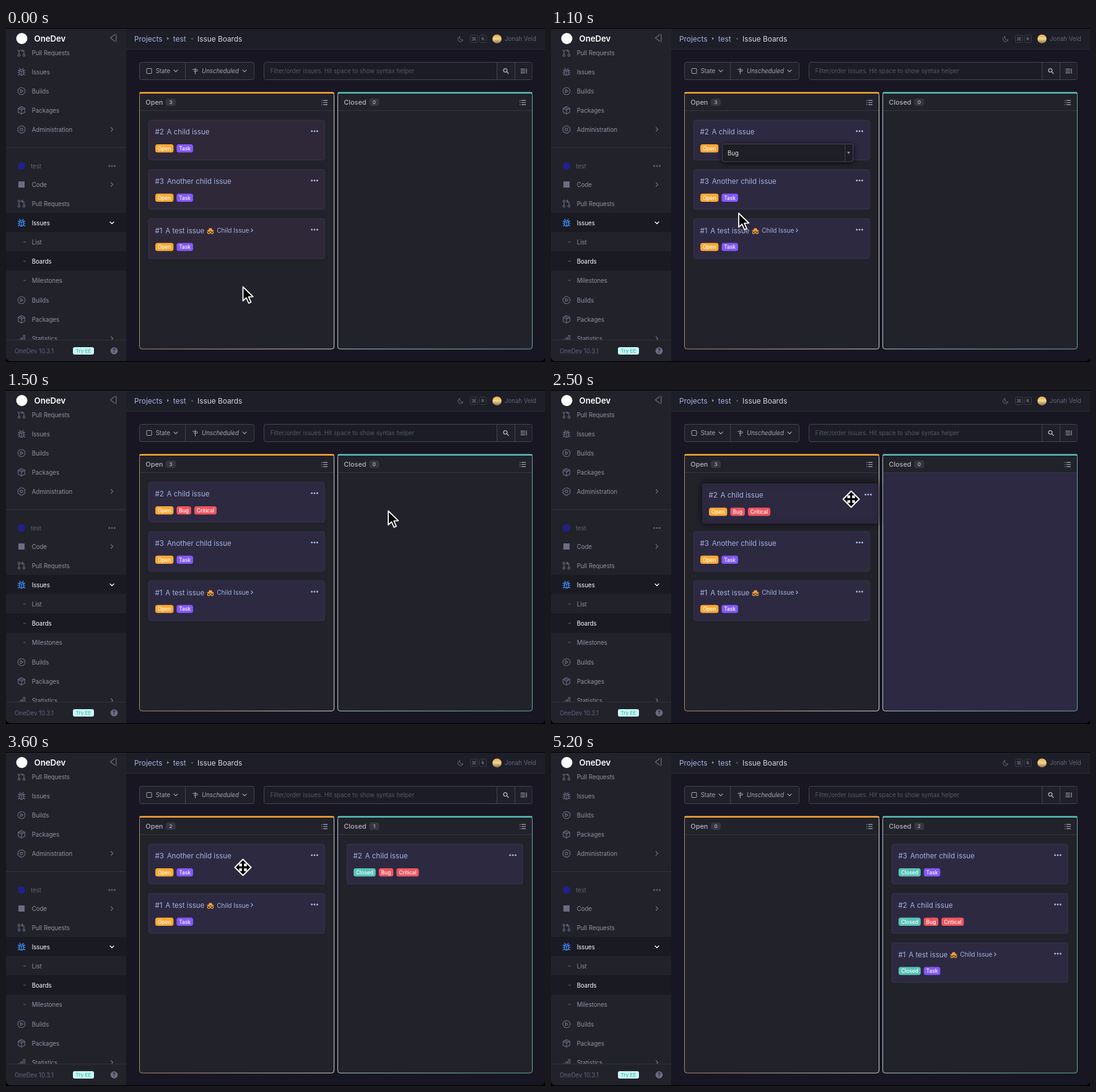
These frames come from a looping animation (870x540 px, 5.3 s). An HTML page with a canvas:

```html
<!DOCTYPE html>
<html lang="en">
<head>
<meta charset="utf-8">
<title>Issue Boards</title>
<style>
html, body { margin: 0; width: 100%; height: 100%; overflow: hidden; background: #000; }
canvas { display: block; width: 870px; height: 540px; }
</style>
</head>
<body>
<canvas id="stage" width="870" height="540"></canvas>
<script>
const ctx = document.getElementById('stage').getContext('2d');
const LOOP = 5300, STEP = 100;
const MUTED = '#9192a2', DIM = '#62637a', LINK = '#a3b3e0', ICON = '#6b6c84';
const ORANGE = '#ffa834', TEAL = '#57c3b8', RED = '#ee5560', PURPLE = '#8258fa';

// time, x, y
const cursorPath = [
  [0, 381.5, 417], [600, 292, 200], [700, 292, 200], [900, 302, 298], [1100, 302, 298],
  [1500, 616, 194], [1600, 616, 194], [2200, 434, 174], [2400, 434, 174],
  [2500, 484.5, 176.5], [2800, 752, 198], [3100, 752, 198], [3600, 382.5, 186.5],
  [3700, 424, 196], [4100, 709.5, 287], [4700, 709.5, 287], [5200, 603, -34]
];
const firstDrag = [[2500, 14, 2], [2800, 318, 24]];
const secondDrag = [[3700, 20, 4], [4000, 318, 96]];

function along(keys, t) {
  let i = 0;
  while (i < keys.length - 2 && t >= keys[i + 1][0]) i++;
  const [a, b] = [keys[i], keys[i + 1]];
  const u = Math.min(1, Math.max(0, (t - a[0]) / (b[0] - a[0])));
  const e = u * u * (3 - 2 * u);
  return [a[1] + (b[1] - a[1]) * e, a[2] + (b[2] - a[2]) * e];
}

function rect(x, y, w, h, fill) {
  ctx.fillStyle = fill;
  ctx.fillRect(x, y, w, h);
}

function box(x, y, w, h, r, fill, stroke) {
  ctx.beginPath();
  ctx.roundRect(x, y, w, h, r);
  if (fill) { ctx.fillStyle = fill; ctx.fill(); }
  if (stroke) { ctx.strokeStyle = stroke; ctx.lineWidth = 1; ctx.stroke(); }
}

function disc(x, y, r, fill) {
  ctx.beginPath();
  ctx.arc(x, y, r, 0, Math.PI * 2);
  ctx.fillStyle = fill;
  ctx.fill();
}

// y is the middle of the capital letters
function text(s, x, y, color, size = 9.62, style = '400', align = 'left') {
  ctx.font = `${style} ${size}px Inter, sans-serif`;
  ctx.textAlign = align;
  ctx.fillStyle = color;
  ctx.fillText(s, x, y + size * 0.364);
  return ctx.measureText(s).width;
}

function icon(d, x, y, stroke, width = 1.1, fill) {
  const p = new Path2D(d);
  ctx.save();
  ctx.translate(x, y);
  ctx.lineWidth = width;
  ctx.lineCap = ctx.lineJoin = 'round';
  if (fill) { ctx.fillStyle = fill; ctx.fill(p); }
  if (stroke) { ctx.strokeStyle = stroke; ctx.stroke(p); }
  ctx.restore();
}

const ring = (r, x = 0, y = 0) => `M${x - r} ${y}a${r} ${r} 0 1 0 ${2 * r} 0a${r} ${r} 0 1 0 ${-2 * r} 0`;
const shapes = {
  pull: ring(1.7, -4, -4) + ring(1.7, -4, 4) + ring(1.7, 4, 4) + 'M-4 -2V2M4 2V-2Q4 -4 2 -4H0M2 -6L0 -4L2 -2',
  bug: 'M-3.2 -1.5Q-3.2 -4 0 -4T3.2 -1.5V2Q3.2 5.4 0 5.4T-3.2 2ZM-3.2 -1.5H3.2M0 -1.5V5M-2 -4L-3 -6M2 -4L3 -6' +
    'M-3.2 1H-6M3.2 1H6M-3.2 -1L-5.4 -3M3.2 -1L5.4 -3M-3 3L-5.4 5M3 3L5.4 5',
  play: ring(5.8) + 'M-1.7 -2.6V2.6L2.6 0Z',
  cube: 'M0 -6L5.4 -3.2V3.2L0 6L-5.4 3.2V-3.2ZM-5.4 -3.2L0 -.3L5.4 -3.2M0 -.3V6M-2.7 -4.6L2.7 -1.8',
  gear: ring(2.1) + 'M-2 -5.8H2L3.2 -4.2L5 -3.8L6 -1.2L5 0L6 1.8L4.4 4L3 4.4L1.8 5.9H-1.8L-3 4.4L-4.6 4L-6 1.6L-5 0L-6 -1.4L-4.8 -3.8L-3 -4.2Z',
  bars: 'M-5.5 6V2H-3V6ZM-1.2 6V-1H1.2V6ZM3 6V-5H5.5V6Z',
  right: 'M-1.5 -3L1.5 0L-1.5 3',
  down: 'M-3 -1.5L0 1.5L3 -1.5',
  list: 'M-1.5 -3.3H4.5M-1.5 0H4.5M-1.5 3.3H4.5M-4.3 -3.3h.3M-4.3 0h.3M-4.3 3.3h.3',
  plus: 'M-3.8 0H3.8M0 -3.8V3.8',
  arrow: 'M1 1.5V24L6.3 19.2L10.3 28L14 26.3L10 17.7L17.3 17.3Z',
  diamond: 'M0 -13L13 0L0 13L-13 0Z',
  moon: 'M-1 -4A4.2 4.2 0 1 0 4.2 1.2A4 4 0 0 1 -1 -4Z'
};

function dots(x, y, color) {
  for (const d of [-4.4, 0, 4.4]) disc(x + d, y, 1.5, color);
}

function sidebar() {
  rect(0, 0, 194, 540, '#22222b');
  ctx.save();
  ctx.beginPath();
  ctx.rect(0, 35, 194, 469);
  ctx.clip();
  rect(0, 299, 194, 31, '#1a1a23');
  rect(0, 361, 194, 31.5, '#1a1a23');
  const items = [
    ['Pull Requests', 40, 'pull'], ['Issues', 71, 'bug'], ['Builds', 102, 'play'],
    ['Packages', 133, 'cube'], ['Administration', 164, 'gear', 1], ['Code', 253, '', 1],
    ['Pull Requests', 284, 'pull'], ['Builds', 440, 'play'], ['Packages', 471, 'cube'],
    ['Statistics', 502, 'bars', 1]
  ];
  for (const [label, y, shape, more] of items) {
    if (shape) icon(shapes[shape], 25, y, ICON);
    text(label, 41.7, y + .3, MUTED);
    if (more) icon(shapes.right, 171, y, ICON, 1.2);
  }
  rect(20, 248, 10, 10, ICON);
  icon(shapes.bug, 25, 315, '#3f93ff', 1.2);
  text('Issues', 41.7, 315.3, '#fff');
  icon(shapes.down, 171, 315, '#fff', 1.3);
  [['List', 346.5], ['Boards', 377.5], ['Milestones', 408.5]].forEach(([label, y], i) => {
    rect(28, y - 1, 4, 1, DIM);
    text(label, 41.7, y + .3, i === 1 ? '#fff' : MUTED);
  });
  rect(0, 193, 194, 1, '#34343f');
  disc(25, 223, 6, '#21208a');
  text('test', 40, 223.3, DIM);
  dots(171, 223, DIM);
  ctx.restore();

  disc(25.5, 17, 9, '#fff');
  text('OneDev', 45.5, 17.5, '#fff', 13.2, '600');
  icon('M3 -5.5L-4 0L3 5.5M5.3 -6V6', 172.5, 16, ICON, 1.2);
  rect(0, 504, 194, 1, '#30303b');
  text('OneDev 10.3.1', 14, 522.3, DIM);
  box(108, 516, 34, 12, 3, '#c9f7f5');
  text('Try EE', 125, 522.2, '#27b5ab', 8.2, '400', 'center');
  disc(174.5, 522, 5.8, '#6c6d82');
  text('?', 174.5, 522.2, '#22222b', 8.5, '700', 'center');
}

function topbar() {
  rect(194, 0, 676, 35, '#1e1e28');
  rect(0, 34, 870, 1, '#2c2c38');
  text('Projects', 207, 17.8, LINK, 11.85);
  icon('M-1.4 -2.4L1.6 0L-1.4 2.4Z', 261.5, 17, null, 1, MUTED);
  text('test', 269.8, 17.8, LINK, 11.85);
  disc(300.5, 17.5, 1.3, DIM);
  text('Issue Boards', 309, 17.8, '#d5d5e0', 11.85);
  icon(shapes.moon, 733.5, 17.8, ICON, 1);
  box(749.5, 11.5, 12, 12, 2, null, '#3b3b49');
  box(764.5, 11.5, 11, 12, 2, null, '#3b3b49');
  const knots = [[-2, -2], [2, -2], [-2, 2], [2, 2]].map(([x, y]) => ring(1, x, y)).join('');
  icon(knots + 'M-1 -2V2M1 -2V2M-2 -1H2M-2 1H2', 755.5, 17.5, DIM, .8);
  text('k', 770, 17.3, MUTED, 8, '400', 'center');
  const g = ctx.createLinearGradient(0, 10, 0, 25);
  g.addColorStop(0, '#e5a64d');
  g.addColorStop(.5, '#f1d68a');
  g.addColorStop(1, '#8a6b4d');
  disc(792.5, 17.7, 7.3, g);
  text('Jonah Veld', 805, 17.8, DIM);
}

function toolbar() {
  const edge = '#454552';
  box(215.5, 55.5, 185, 28, 3, '#20202a', edge);
  rect(289, 55, 1, 28, edge);
  box(227, 65.5, 8, 8, 1, null, '#a5a6b5');
  text('State', 241.7, 69.8, '#a5a6b5');
  icon(shapes.down, 274, 69.3, '#a5a6b5', 1.2);
  icon('M0 5V-4.5M-4 -2.5H2.5L4.3 -1L2.5 .5H-2', 305.5, 69.5, '#a5a6b5', 1);
  text('Unscheduled', 316, 69.8, '#a5a6b5', 9.62, 'italic 400');
  icon(shapes.down, 385, 69.3, '#a5a6b5', 1.2);
  box(416.5, 55.5, 433, 28, 3, '#1c1c26', edge);
  box(793, 56, 56.5, 27, [0, 3, 3, 0], '#20202a');
  rect(792, 55, 1, 28, edge);
  rect(821, 55, 1, 28, edge);
  text('Filter/order issues. Hit space to show syntax helper', 426.5, 69.8, '#565769');
  icon(ring(2.9, -1, -1) + 'M1.3 1.3L4 4', 807, 69.5, '#b5b5c4', 1.3);
  icon('M-4.5 -3H2M-4.5 0H2M-4.5 3H2M4.5 -3.5V3.5', 835.5, 69.5, '#b5b5c4', 1);
}

function column(x, name, count, color, sides, hot) {
  box(x, 104, 315, 415.5, 4, '#22222b');
  if (hot) box(x + 1, 134, 313, 385, [0, 0, 3, 3], '#2d2942');
  const g = ctx.createLinearGradient(x, 0, x + 315, 0);
  sides.forEach((c, i) => g.addColorStop(i, c));
  box(x + .5, 104.5, 314, 414.5, 4, null, g);
  box(x, 103.5, 315, 2.6, [3, 3, 0, 0], color);
  rect(x + 1, 133, 313, 1, '#363643');
  const w = text(name, x + 10.3, 120.3, '#b3b3c2', 10.9, '500');
  box(x + 15 + w, 114, 16, 12, 4, '#363642');
  text(count, x + 23 + w, 120.2, '#c0c0cf', 8, '500', 'center');
  icon(shapes.list, x + 299, 120.5, '#a9aac6', 1.2);
}

function card(issue, x, y, fill, lifted) {
  ctx.save();
  if (lifted) { ctx.shadowColor = '#000c'; ctx.shadowBlur = 12; }
  box(x + .5, y + .5, 283.5, 64, 3, fill, lifted ? fill : '#3a3650');
  ctx.restore();
  const w = text('#' + issue.id, x + 10.5, y + 19.3, LINK, 11.5);
  text(issue.title, x + 15.3 + w, y + 19.3, LINK, 11.5);
  if (issue.id === 1) {
    icon(ring(2, -2.7, 2.5) + ring(2, 2.7, 2.5) + 'M-5 -.8H5M-.8 2H.8', x + 100, y + 20, ORANGE, 1.2);
    icon('M-3 -1L-2 -4.6L0 -4L2 -4.6L3 -1Z', x + 100, y + 20, null, 1, ORANGE);
    text('Child Issue', x + 110.3, y + 19.5, LINK, 10);
    icon('M-1.2 -2.4L1.2 0L-1.2 2.4', x + 167, y + 19, LINK, 1.1);
  }
  dots(x + 268, y + 18, LINK);
  let bx = x + 11;
  for (const [label, color] of issue.badges) {
    ctx.font = '500 8.4px Inter, sans-serif';
    const bw = ctx.measureText(label).width + 7.8;
    box(bx, y + 39.3, bw, 13.2, 3.5, color);
    text(label, bx + bw / 2, y + 46.2, '#fff', 8.4, '500', 'center');
    bx += bw + 5;
  }
}

function typeSelect(t) {
  const open = t >= 700 && t < 1100;
  ctx.save();
  ctx.shadowColor = '#000b';
  ctx.shadowBlur = 10;
  ctx.shadowOffsetY = 2;
  box(276.5, 187.5, 211, 28.5, 3, '#1e1e27', '#474755');
  if (open) box(276.5, 216.5, 211, 176, [0, 0, 3, 3], '#1e1e27', '#474755');
  ctx.restore();
  rect(474, 188, 1, 28, '#3c3c49');
  icon(open ? 'M-2.5 2L0 -2L2.5 2Z' : 'M-2.5 -2L0 2L2.5 -2Z', 480.5, 202, null, 1, '#8b8c9c');
  text(t < 1100 ? 'Task' : 'Bug', 285, 202.3, '#e4e4ee');
  if (!open) return;
  const active = t < 800 ? 3 : t < 900 ? 1 : 2;
  ['New Feature', 'Improvement', 'Bug', 'Task', 'Build Failure', 'Support Request'].forEach((name, i) => {
    const y = 220 + 28 * i;
    if (i === active) rect(277, y, 210, 28, '#2d2d3b');
    text(name, 285, y + 14, i === active ? '#fff' : '#a9aaba');
  });
}

function boardState(t) {
  const make = (id, title, closed, ...tags) =>
    ({ id, title, badges: [closed ? ['Closed', TEAL] : ['Open', ORANGE], ...tags] });
  const task = ['Task', PURPLE];
  const editing = t >= 600 && t < 1200;
  const tags = t >= 1200 ? [['Bug', RED], ['Critical', RED]] : editing ? [] : [task];
  const two = make(2, 'A child issue', t >= 2900, ...tags);
  const three = make(3, 'Another child issue', t >= 4100, task);
  const one = make(1, 'A test issue', t >= 4200, task);
  const state = { editing, open: [two, three, one], closed: [], counts: [3, 0] };
  if (t >= 2900) Object.assign(state, { open: [three, one], closed: [two], counts: [2, 1] });
  if (t >= 4100) Object.assign(state, { open: [one], closed: [three, two], counts: [1, 2] });
  if (t >= 4200) Object.assign(state, { open: [], closed: [three, two, one], counts: [0, 2] });
  const drag = t >= 2500 && t < 2900 ? firstDrag : t >= 3700 && t < 4100 ? secondDrag : null;
  if (drag) {
    const offset = along(drag, t);
    state.lifted = { issue: state.open[0], x: 230 + offset[0], y: 149 + offset[1] };
    state.open = offset[0] > 160 ? state.open.slice(1) : [null, ...state.open.slice(1)];
  }
  return state;
}

function drawCursor(x, y, moving) {
  if (!moving) return icon(shapes.arrow, x, y, '#fff', 1.8, '#000');
  icon(shapes.diamond, x, y, '#fff', 2, '#000');
  for (const dx of [-3.9, 3.9]) for (const dy of [-3.9, 3.9]) {
    rect(x + dx - 2.2, y + dy - 2.2, 4.4, 4.4, '#fff');
  }
}

function draw(t) {
  rect(0, 0, 870, 540, '#171622');
  topbar();
  sidebar();
  toolbar();
  const s = boardState(t);
  const fill = t < 1100 ? '#2e2838' : '#2d2941';
  column(215, 'Open', s.counts[0], ORANGE, ['#a68a66', '#d9d3cf'], false);
  column(535, 'Closed', s.counts[1], TEAL, ['#b4c9cb', '#68aaa5'], !!s.lifted);
  const [cx, cy] = along(cursorPath, t);
  let over = !!s.lifted;
  [s.open, s.closed].forEach((issues, col) => issues.forEach((issue, i) => {
    if (!issue) return;
    const x = 230 + 320 * col, y = 148.7 + 79.7 * i;
    card(issue, x, y, fill);
    if (cx > x && cx < x + 284 && cy > y && cy < y + 65) over = true;
  }));
  if (s.lifted) card(s.lifted.issue, s.lifted.x, s.lifted.y, fill, true);
  if (s.editing) typeSelect(t);
  if (t < 5200) drawCursor(cx, cy, over && !s.editing);

  // window edge
  rect(0, 0, 870, 1, '#000');
  ctx.beginPath();
  ctx.rect(0, 500, 870, 40);
  ctx.roundRect(0, 490, 870, 48.7, 7);
  ctx.save();
  ctx.clip('evenodd');
  rect(0, 520, 870, 20, '#000');
  ctx.restore();
}

function frame() {
  const t = performance.now() % LOOP;
  draw(Math.floor(t / STEP) * STEP);
  requestAnimationFrame(frame);
}
frame();
</script>
</body>
</html>
```
